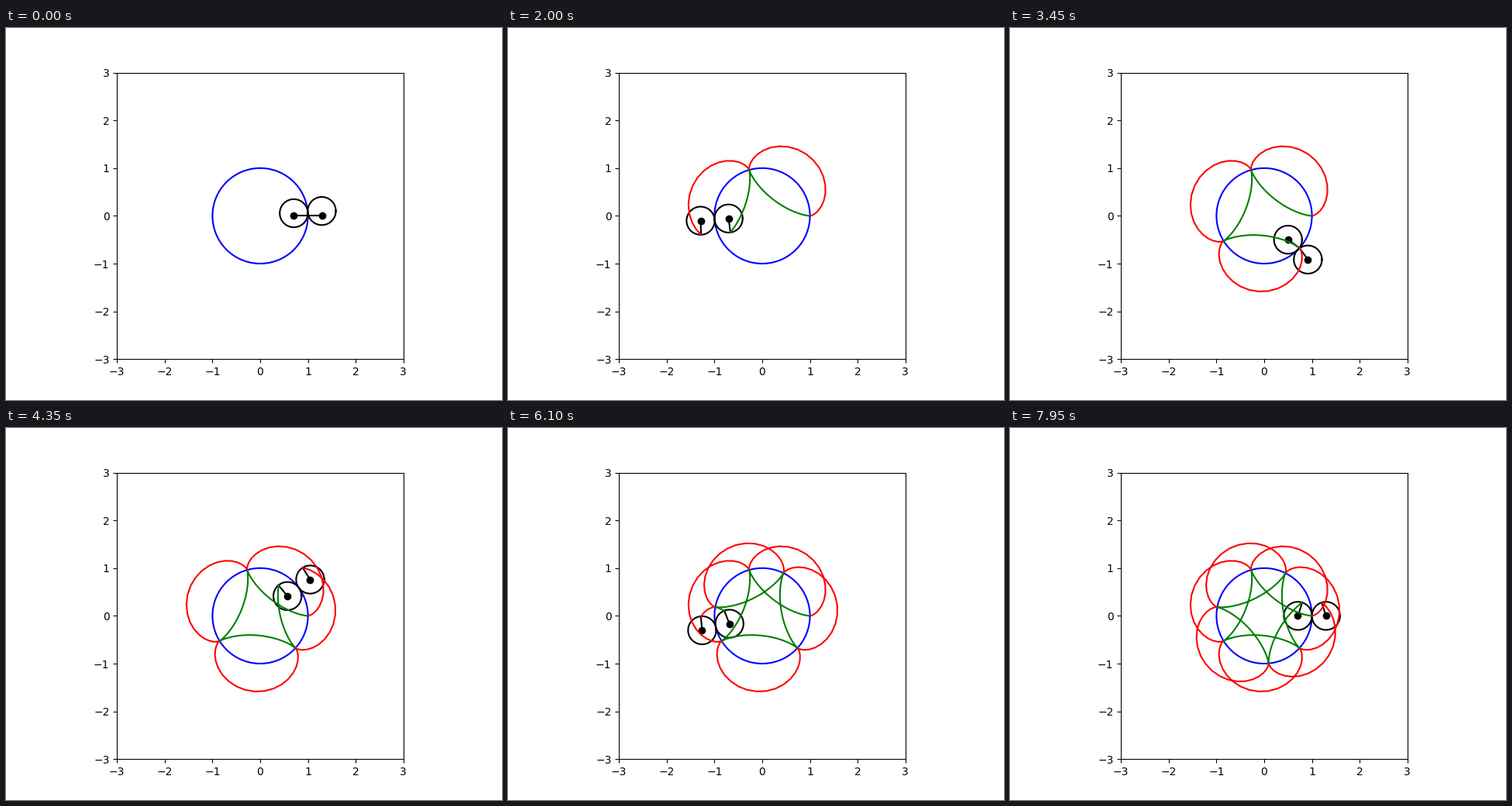
Recreate the animation shown at these times as a matplotlib script. Size 640 px wide and 480 px high, loop 8000 ms.

```python
import numpy as np
import matplotlib.pyplot as plt
from matplotlib.animation import FuncAnimation

R = 1.0
K = 3.4             # ratio of the fixed radius to the rolling radius
r = R / K
FRAMES = 160
STEP = 4 * np.pi / FRAMES

t = STEP * np.arange(FRAMES + 1)
theta = np.linspace(0, 2 * np.pi, 100)


class Roller:
    """A small circle rolling on the outside (side=1) or inside (side=-1)."""

    def __init__(self, ax, side, color):
        dist = R + side * r
        spin = K + side
        self.cx, self.cy = dist * np.cos(t), dist * np.sin(t)
        self.px = self.cx - side * r * np.cos(spin * t)
        self.py = self.cy - r * np.sin(spin * t)
        self.rim, = ax.plot([], [], "k")
        self.arm, = ax.plot([], [], "k")
        self.hub, = ax.plot([], [], "ko")
        self.trace, = ax.plot([], [], color, zorder=2.1)

    def place(self, i, rim_i):
        self.rim.set_data(self.cx[rim_i] + r * np.cos(theta),
                          self.cy[rim_i] + r * np.sin(theta))
        self.arm.set_data([self.cx[i], self.px[i]], [self.cy[i], self.py[i]])
        self.hub.set_data([self.cx[i]], [self.cy[i]])
        n = i + 1 if i else 0
        self.trace.set_data(self.px[:n], self.py[:n])
        return self.rim, self.arm, self.hub, self.trace


fig, ax = plt.subplots(figsize=(6.4, 4.8), dpi=100)
ax.set_aspect("equal")
ax.set_xlim(-3, 3)
ax.set_ylim(-3, 3)
ax.set_xticks(range(-3, 4))
ax.set_yticks(range(-3, 4))

ax.plot(R * np.cos(theta), R * np.sin(theta), "b")
rollers = [Roller(ax, 1, "r"), Roller(ax, -1, "g")]


def update(frame):
    # the arms rest at the start for one frame while the rims already move
    i = frame + 1 if frame else 0
    return [a for roller in rollers for a in roller.place(i, frame + 1)]


anim = FuncAnimation(fig, update, frames=FRAMES, interval=50,
                     init_func=lambda: update(0), repeat=True, repeat_delay=0)
plt.show()
```
